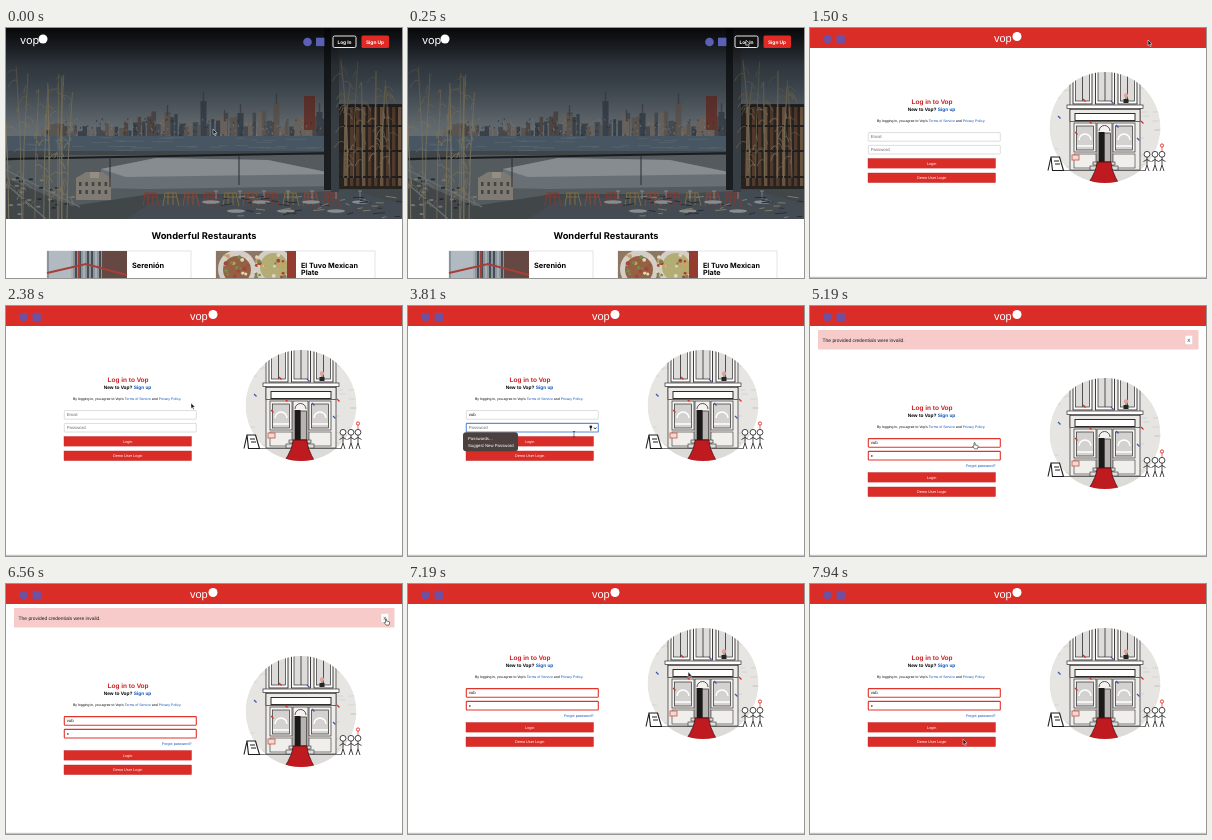
An HTML page for the animation above (8 s loop, 396 by 250 pixels).

```html
<!DOCTYPE html>
<html lang="en">
<head>
<meta charset="utf-8">
<style>
  html, body { margin: 0; width: 100%; height: 100%; overflow: hidden; background: #fff; }
  svg { display: block; width: 396px; height: 250px; }
  text { font-family: "Liberation Sans", Arial, sans-serif; text-rendering: geometricPrecision; white-space: pre; }
  #home text { font-family: Inter, sans-serif; }
</style>
</head>
<body>
<svg id="stage" viewBox="0 0 396 250"></svg>
<script>
const RED = '#db2d28', INK = '#1c1c1c', LINK = '#0f52b8';
let seed = 11;
const rnd = (a, b) => a + (b - a) * ((seed = seed * 16807 % 2147483647) / 2147483647);
const many = (n, f) => Array.from({ length: n }, (_, i) => f(i)).join('');
const rect = (x, y, w, h, fill, more = '') =>
  `<rect x="${x}" y="${y}" width="${w}" height="${h}" fill="${fill}" ${more}/>`;
const path = (d, stroke, width = 1, fill = 'none') =>
  `<path d="${d}" stroke="${stroke}" stroke-width="${width}" fill="${fill}"/>`;
const shape = (d, fill) => path(d, 'none', 0, fill);
const circle = (x, y, r, fill, more = '') => `<circle cx="${x}" cy="${y}" r="${r}" fill="${fill}" ${more}/>`;
const text = (x, y, size, str, fill = INK, more = '') =>
  `<text x="${x}" y="${y}" font-size="${size}" fill="${fill}" ${more}>${str}</text>`;
const MID = 'text-anchor="middle" ', BOLD = 'font-weight="700" ';
const group = (id, body) => `<g id="${id}">${body}</g>`;
const clipped = (id, body) => `<g clip-path="url(#${id})">${body}</g>`;
const brand = (x, y) => text(x, y, 11, 'vop', '#fff') + circle(x + 23, y - 5, 4.5, '#fff');

function skyline() {
  const tones = ['#59626c', '#77706b', '#4a5561', '#8b8078', '#655c58'];
  const block = (x, y, w) => rect(x, y, w, 110 - y, tones[Math.floor(rnd(0, 5))]);
  const towers = [[161, 79], [197, 66], [218, 84], [234, 78], [270, 67], [313, 77]]
    .map(([x, y]) => block(x - 2.5, y + 7, 6) + path(`M${x + .5} ${y - 2}v11`, '#555b63', 1.4)).join('');
  return many(64, i => block(35 + i * 4.6, i < 20 ? rnd(94, 104) : rnd(83, 99), rnd(3, 6))) + towers +
    rect(298, 68, 11, 34, '#82453d') +
    many(200, i => rect(rnd(50, 328), rnd(90, 109), 1.2, 1.8, i % 2 ? '#a5a29b' : '#343c45', 'opacity=".6"'));
}

// Bamboo stalks with drooping leaves, growing up from y1 to y0
function bamboo(n, x0, x1, y0, y1, color) {
  return many(n, () => {
    const x = rnd(x0, x1), top = rnd(y0, y0 + 30), lean = rnd(-7, 7);
    return path(`M${x} ${y1}Q${x} ${(top + y1) / 2} ${x + lean} ${top}`, color, rnd(.7, 1.5)) +
      many(9, () => {
        const u = rnd(.1, 1), y = y1 + (top - y1) * u, side = rnd(-11, 11);
        return path(`M${x + lean * u * u} ${y}q${side / 2} -4 ${side} ${rnd(1, 7)}`, color, rnd(.4, 1));
      });
  });
}

function patio() {
  const chair = (x, i) => path(`M${x} 178l2-13h11l3 13M${x + 2} 169h12M${x + 5} 165v12M${x + 10} 165v12`,
    ['#b04a3c', '#a58b55', '#b5604a'][i % 3], 1.1);
  const plate = i => `<ellipse cx="${205 + i * 25}" cy="${174 + i % 2 * 9}" rx="9" ry="1.8" fill="#b4b9bd"/>` +
    path(`M${210 + i * 24} 171v-8m-2 0h4`, '#c4c8ca', .7);
  return shape('M120 191L150 172L345 162L396 176V191Z', '#59636c') +
    many(10, i => chair(137 + i * 20, i)) + many(7, plate) +
    many(45, () => path(`M${rnd(215, 390)} ${rnd(168, 190)}l${rnd(3, 12)} ${rnd(-2, 2)}`, rnd(0, 1) > .5 ? '#a9a08c' : '#353c44', 1));
}

function hero() {
  const fence = many(10, i => rect(338 + i * 6, 78, 3.4, 80, i % 3 ? '#6b4b39' : '#8a6e53'));
  return rect(0, 0, 396, 191, 'url(#sky)') + skyline() +
    rect(0, 108, 396, 18, '#5f7282') +
    many(40, () => rect(rnd(0, 320), rnd(109, 125), rnd(6, 22), .6, '#7b8b98')) +
    rect(0, 123, 396, 68, '#565c60') +
    shape('M0 133L66 127H330V166H145L66 178L0 150Z', '#6f787d') +
    shape('M95 141L150 130L262 132L330 146V158L142 161L95 160Z', '#8b949b') +
    shape('M95 141L150 130L262 132L330 146L120 149Z', '#b2b9be') +
    path('M0 142L74 179M0 156L40 191', '#8a9298', 1.2) +
    many(26, () => rect(rnd(2, 66), rnd(145, 188), 4, 1.8, rnd(0, 1) > .4 ? '#33393e' : '#a09d96')) +
    shape('M70 150l10-6h16l9 6v22h-35z', '#a8a196') + rect(84, 144, 9, 6, '#c2bcb0') +
    many(10, i => rect(73 + i % 5 * 6.4, 154 + Math.floor(i / 5) * 8, 2.5, 4, '#575a5c')) +
    rect(333, 76, 63, 85, '#332e2c') + fence +
    path('M333 78h63M333 98h63M333 123h63M333 149h63', '#2a2828', 2) +
    patio() +
    path('M0 131L330 125', '#20262b', 2) + path('M104 129v30M233 127v30', '#343b41', 1) +
    rect(318, 0, 7, 162, '#22282c') + rect(325, 0, 8, 164, '#4a535a') +
    bamboo(10, 0, 62, 38, 191, '#a39879') + bamboo(7, 336, 394, 28, 150, '#968c70') +
    rect(0, 0, 396, 191, 'url(#shade)');
}

function home() {
  const card = (x, w) => rect(x, 223, w, 40, '#fff', 'stroke="#d8d8d8" stroke-width=".7"');
  const cafe = rect(41, 223, 80, 27, '#8c959b') + rect(43, 223, 23, 27, '#b1bac0') +
    many(9, i => rect(65 + i * 4, 223, 2, 27, i % 3 ? '#454e57' : '#a8afb4')) +
    rect(96, 223, 25, 27, '#664842') + path('M41 245L80 236L121 247M73 223v27', '#a53f37', 2);
  const food = rect(210, 223, 80, 27, '#8e7762') + circle(231, 241, 19, '#d3cfc6') + circle(231, 242, 14, '#946145') +
    circle(268, 239, 19, '#d3cfc6') + circle(268, 239, 14, '#b4ac75') +
    many(45, i => circle(rnd(219, 280), rnd(227, 249), rnd(1, 2.3), ['#c9a05c', '#7a8550', '#a4473b', '#e2d6be'][i % 4])) +
    rect(281, 223, 9, 27, '#953c31');
  return hero() + brand(14, 16) +
    circle(301.5, 14, 4.3, '#5b60b4') + rect(310, 9.7, 8.4, 8.4, '#5b60b4') +
    rect(327, 8, 23, 11.5, '#111', 'rx="1.5" stroke="#fff" stroke-width=".9"') +
    text(338.5, 15.6, 4.8, 'Log In', '#fff', MID + BOLD) +
    rect(355.5, 7.5, 27.5, 12.5, '#df2a25', 'rx="1.5"') +
    text(369, 15.6, 4.8, 'Sign Up', '#fff', MID + BOLD) +
    text(198, 211, 9.3, 'Wonderful Restaurants', '#000', MID + BOLD) +
    card(41, 144) + cafe + text(126, 239.5, 7.4, 'Serenión', '#000', BOLD) +
    card(210, 159) + clipped('photo', food) + text(295, 239.5, 7.2, 'El Tuvo Mexican', '#000', BOLD) +
    text(295, 247.2, 7.2, 'Plate', '#000', BOLD);
}

function shop() {
  const line = '#2e2c2b';
  const box = (x, y, w, h, fill, sw = .7) => rect(x, y, w, h, fill, `stroke="${line}" stroke-width="${sw}"`);
  const upper = x => box(x, 40, 19, 36, '#fff', .9) + box(x + 2.5, 40, 14, 33, '#dedcda') + path(`M${x + 9.5} 40v33`, line, .8);
  const lower = x => box(x, 95, 22, 29, '#f6f4f2') + box(x + 2.5, 98, 17, 24, '#d4d2d0') +
    path(`M${x + 5} 112a6 6 0 0 1 12 0M${x + 3} 118h16`, '#fff', 1.5) + box(x, 126, 22, 14, '#f1efec', .6);
  const person = x => circle(x, 126.3, 2.9, '#fff', `stroke="${INK}" stroke-width=".8"`) +
    path(`M${x} 129v8l-2 6M${x} 137l2 6M${x - 3.5} 133.5l3.5-2l3.5 2`, INK, .8);
  const bricks = many(44, () => path(`M${rnd(240, 346)} ${Math.round(rnd(48, 140))}h${rnd(3, 7)}`, '#cbc8c4', .6));
  const confetti = [[273, 71, 1], [301, 73, 0], [331, 93, 1], [327, 110, 0], [248, 88, 0], [279, 93, 1], [265, 104, 1], [306, 97, 0]]
    .map(([x, y, red]) => path(`M${x} ${y}l2.5 2.5`, red ? RED : '#3c57ad', 1.3)).join('');
  return clipped('disc', circle(295, 99.5, 55.5, '#e7e5e2') + bricks +
    rect(239, 142, 112, 14, '#dddbd8') +
    box(260, 40, 70, 102, '#f0eeeb') + upper(263) + upper(285.5) + upper(308) +
    box(257, 77, 76, 3.5, '#fff') + box(260, 81.5, 70, 12, '#eceae7') +
    box(265, 85.5, 60, 7, '#fff', 1) + lower(264) + lower(303) +
    box(287, 95, 15, 45, '#f4f2ef') + rect(288.5, 104, 6, 31, '#1b1a19') + box(294.5, 105, 6, 29, '#b7b4b1') +
    path('M289 103a5 5 0 0 1 11 0', line, .8) +
    box(283, 134, 22, 3, '#ddd', .6) + box(280, 138, 28, 4, '#ddd', .6) +
    path('M287 134H301Q301 142 309 156H278Q287 142 287 134', '#3a0c0c', .7, '#be1a20')) +
    path('M253 142.5H284M304 142.5H335', '#555', .8) + confetti +
    path('M316 71v-4', '#3f7440', 1) + circle(316, 67.5, 2.2, '#e3a39c') + rect(313.5, 71, 5, 4, '#262524') +
    rect(262, 127, 7, 5, '#f4d8d3', 'stroke="#c55346" stroke-width=".8"') +
    path('M241 129h8.5l4 13.5h-11zM241 129l-3 13.5M244 133h5M245 136h5', INK, 1.1, '#fff') +
    person(337) + person(345) + person(352) + circle(352, 117.5, 1.6, '#fff', `stroke="${RED}" stroke-width=".9"`) +
    path('M352 119v4', RED, .7);
}

function login() {
  const field = (id, y) => rect(58.3, y, 132, 8.6, '#fff', `id="${id}" rx=".6"`);
  const button = (y, label) => rect(58, y, 127.5, 9.6, RED, 'stroke="#b8262c" stroke-width=".4"') +
    text(121.7, y + 6.1, 3.8, label, '#fff', MID);
  const form = text(122, 76.3, 6.5, 'Log in to Vop', '#cb1a1c', MID + BOLD) +
    text(121.5, 82.6, 4.8, `New to Vop? <tspan fill="${LINK}">Sign up</tspan>`, '#000', MID + BOLD) +
    text(67, 94, 3.5, `By logging in, you agree to Vop's <tspan fill="${LINK}">Terms of Service</tspan> and <tspan fill="${LINK}">Privacy Policy</tspan>.`, '#000') +
    field('email', 104.6) + text(60.7, 110.4, 4.3, '', INK, 'id="user"') +
    field('pass', 117.4) + text(60.7, 123.3, 4.3, '', INK, 'id="secret"') +
    group('key', circle(182.8, 120.8, 1.4, INK) + path('M182.8 121v3.5M186 121.5l1.2 1.5l1.2-1.5', INK, .9)) +
    group('forgot', text(185.5, 133.3, 3.7, 'Forgot password?', LINK, 'text-anchor="end"')) +
    group('buttons', button(130.5, 'Login') + button(145, 'Demo User Login')) +
    group('popup', rect(55, 126.3, 55, 19, '#4c403f', 'rx="3"') +
      text(60, 133.8, 4.3, 'Passwords...', '#fff') + text(60, 141, 4.3, 'Suggest New Password', '#fff'));
  return rect(0, 0, 396, 250, '#fff') + rect(0, 0, 396, 20, RED) + brand(184, 13.5) +
    circle(17.5, 11, 4.3, '#7050a0') + rect(26.5, 6.8, 8.4, 8.4, '#7050a0') +
    group('banner', rect(8, 24, 380.5, 19.5, '#f6cbc9', 'rx="1"') +
      text(12.6, 35.8, 4.9, 'The provided credentials were invalid.') +
      rect(375, 29.6, 7.6, 9, '#fff', 'rx="1" stroke="#ccc" stroke-width=".4"') + text(378.8, 35.8, 4.6, 'X', INK, MID)) +
    group('content', form + shop()) + rect(0, 248.8, 396, 1.2, '#c4c4c4');
}

const $ = id => document.getElementById(id);
const stop = (at, color, alpha = 1) => `<stop offset="${at}" stop-color="${color}" stop-opacity="${alpha}"/>`;
$('stage').innerHTML = `<defs>
  <linearGradient id="sky" x2="0" y2="1">${stop(0, '#465260') + stop(.3, '#5f6d79') + stop(.55, '#858f94')}</linearGradient>
  <linearGradient id="shade" x2="0" y2="1">${stop(0, '#000', .9) + stop(.2, '#000', .46) + stop(.5, '#000', .25) + stop(1, '#000', .24)}</linearGradient>
  <clipPath id="disc">${circle(295, 99.5, 55.5, '#000')}</clipPath>
  <clipPath id="photo">${rect(210, 223, 80, 27, '#000')}</clipPath></defs>` +
  group('home', home()) + group('login', login()) +
  group('cursor',
    group('arrow', path('M0 0V5.6L1.3 4.4L2.3 6.6L3.2 6.2L2.3 4.1H4Z', '#fff', .5, '#111')) +
    group('beam', path('M-1.2 0h2.4M0 0v5.5M-1.2 5.5h2.4', '#333', .6)) +
    group('hand', path('M0 .3Q.6-.5 1.1.3V2.4L3.6 2.9Q4.3 3.1 4.1 4.2L3.4 6.4H.6L-1.3 3.9Q-1.2 3 0 3.7Z', '#222', .6, '#fff')));

// Pointer stops: time, x, y
const route = [[0, 207, 101], [60, 207, 101], [250, 338, 12], [1560, 338, 12], [2310, 185, 97], [2420, 185, 97],
  [2700, 130, 107], [3250, 130, 107], [3480, 120, 119], [3600, 122, 119], [3810, 166, 125.5], [4010, 165, 136],
  [5200, 164, 136.5], [6300, 379, 34.5], [6800, 380, 35], [7650, 153, 155], [8000, 153, 155]];

function pointer(t) {
  const i = route.findIndex(p => p[0] > t), [t0, x0, y0] = route[i - 1], [t1, x1, y1] = route[i];
  const u = (t - t0) / (t1 - t0), k = u * u * (3 - 2 * u);
  return [x0 + (x1 - x0) * k, y0 + (y1 - y0) * k];
}

const show = (id, on) => $(id).style.display = on ? '' : 'none';
function border(id, focus, error) {
  $(id).setAttribute('stroke', focus ? '#5a8fd8' : error ? '#e0332a' : '#c6c6c6');
  $(id).setAttribute('stroke-width', focus || error ? 1.1 : .6);
}
function value(id, typed, hint) {
  $(id).textContent = typed || hint;
  $(id).setAttribute('fill', typed ? '#111' : '#6c6c6c');
}

function draw(t) {
  const failed = t >= 4310, banner = failed && t < 6810;
  const onEmail = t >= 2750 && t < 3480, onPass = t >= 3480 && t < 4130;
  show('home', t < 1500);
  show('login', t >= 1500);
  show('banner', banner);
  show('forgot', failed);
  show('popup', t >= 3500 && t < 3900);
  show('key', onPass);
  $('content').setAttribute('transform', `translate(0 ${banner ? 28 : 0})`);
  $('buttons').setAttribute('transform', `translate(0 ${failed ? 8 : 0})`);
  border('email', onEmail, failed);
  border('pass', onPass, failed);
  value('user', 'vub'.slice(0, [2940, 3060, 3190].filter(at => t >= at).length), 'Email');
  value('secret', t >= 3900 ? '●' : '', 'Password');
  $('secret').setAttribute('font-size', t >= 3900 ? 3.6 : 4.3);
  const kind = t > 2500 && t < 3900 ? 'beam' : t >= 3900 && t < 5300 || t > 6250 && t < 6850 ? 'hand' : 'arrow';
  for (const id of ['arrow', 'beam', 'hand']) show(id, id === kind);
  $('cursor').setAttribute('transform', `translate(${pointer(t)})`);
}

const start = performance.now();
(function tick() {
  draw((performance.now() - start) % 8000);
  requestAnimationFrame(tick);
})();
</script>
</body>
</html>
```
